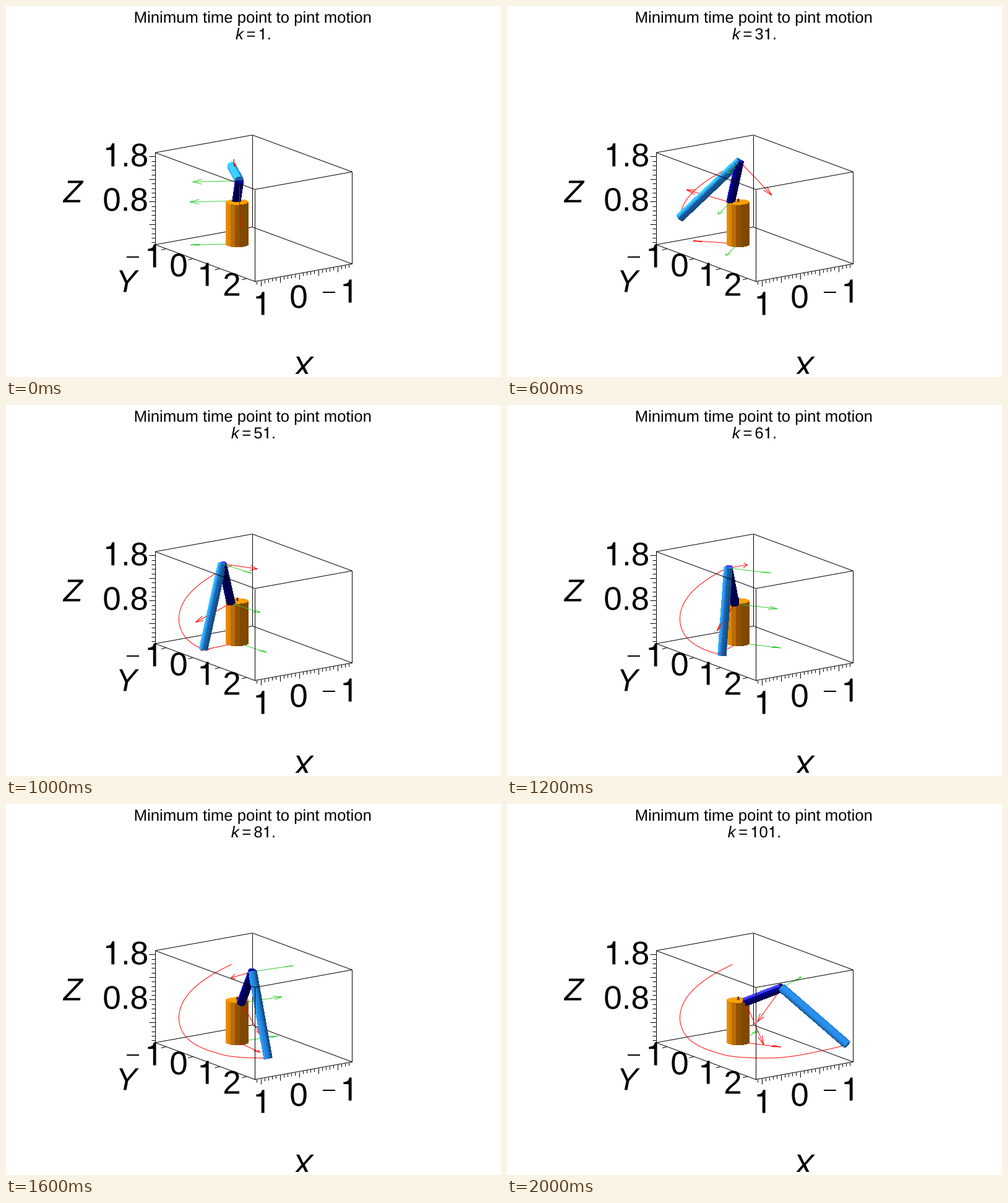
A matplotlib script that plays this animation: 800x600 px, repeating every 2.1 s.

```python
import numpy as np
import matplotlib.pyplot as plt
from matplotlib.animation import FuncAnimation
from matplotlib.collections import LineCollection, PolyCollection
from matplotlib.patches import PathPatch, Rectangle
from matplotlib.path import Path
from matplotlib.textpath import TextPath

W, H, DPI = 800, 600, 100
PX = 72 / DPI  # one pixel in points

# Orthographic camera: azimuth 55, polar angle 75
AZ, POL = np.radians([55, 75])
RIGHT = np.array([-np.sin(AZ), np.cos(AZ), 0])
VIEW = np.array([np.sin(POL) * np.cos(AZ), np.sin(POL) * np.sin(AZ), np.cos(POL)])
UP = np.cross(VIEW, RIGHT)
SCALE, ORIGIN = 75.7, np.array([373.7, 384.7])
LIGHT = -0.6 * RIGHT + 0.75 * UP + 0.3 * VIEW

LO, HI = np.array([-1.383, -1.41, -0.15]), np.array([1.15, 2.30, 1.885])
EZ = np.array([0.0, 0.0, 1.0])
BASE_R, BASE_H = 0.24, 0.915
SHOULDER_R, SHOULDER_Z = 0.17, 0.905
UPPER, FORE, LINK_R = 0.945, 1.88, 0.085

# Shade ramps: dark, middle, light
ORANGE = np.array([(128, 72, 0), (232, 140, 8), (255, 165, 0)]) / 255
NAVY = np.array([(0, 0, 72), (0, 0, 150), (70, 70, 255)]) / 255
SKY = np.array([(22, 78, 134), (42, 152, 250), (60, 212, 255)]) / 255
RED, GREEN, BLUE = (1, 0, 0), (0.2, 0.8, 0.2), (0, 0, 0.5)

# Joint angles in degrees: base turn, upper arm and forearm elevation
KNOTS = np.array([1, 21, 41, 61, 81, 91, 101.0])
JOINTS = np.array([
    [-120, -76.5, -23, 30.5, 84.5, 110.5, 120],
    [138, 119.6, 85, 68.3, 58.4, 43.9, 25.5],
    [-5.5, -28, -62.3, -80.2, -69.1, -51.7, -35],
])
SLOPES = np.gradient(JOINTS, KNOTS, axis=1)
SLOPES[:, [0, -1]] = 0


def project(p):
    p = np.asarray(p, float)
    return ORIGIN + SCALE * np.stack([p @ RIGHT, -(p @ UP)], axis=-1)


def joints(k):
    i = min(np.searchsorted(KNOTS, k, side="right") - 1, len(KNOTS) - 2)
    h = KNOTS[i + 1] - KNOTS[i]
    u = (k - KNOTS[i]) / h
    a, b = JOINTS[:, i], JOINTS[:, i + 1]
    ma, mb = SLOPES[:, i] * h, SLOPES[:, i + 1] * h
    s = u * u * (3 - 2 * u)
    return np.radians(a + (b - a) * s + ma * u * (1 - u) ** 2 - mb * u * u * (1 - u))


def pose(k):
    turn, q2, q3 = joints(k)
    out = np.array([np.cos(turn), np.sin(turn), 0])
    side = np.array([-np.sin(turn), np.cos(turn), 0])
    d2 = np.cos(q2) * out + np.sin(q2) * EZ
    d3 = np.cos(q3) * out + np.sin(q3) * EZ
    shoulder = SHOULDER_R * out + SHOULDER_Z * EZ
    elbow = shoulder + UPPER * d2
    return out, side, d2, d3, shoulder, elbow, elbow + FORE * d3


class Painter:
    """Collects small faces and strokes and sorts them by depth."""

    def __init__(self):
        self.items = []

    def face(self, pts, normal, ramp, bias):
        if normal @ VIEW <= 0:
            return
        t = max(0.0, normal @ LIGHT)
        rgb = [np.interp(t, [0, 0.55, 0.85], ramp[:, c]) for c in range(3)]
        depth = np.mean(pts, axis=0) @ VIEW + bias
        self.items.append((depth, project(pts), rgb, 0.5 * PX, False))

    def stroke(self, a, b, color, step=0.08):
        n = max(1, int(np.ceil(np.linalg.norm(b - a) / step)))
        pts = a + np.linspace(0, 1, n + 1)[:, None] * (b - a)
        for p, q in zip(pts, pts[1:]):
            depth = (p + q) @ VIEW / 2 + 0.02
            self.items.append((depth, project([p, q]), color, PX, True))

    def arrow(self, start, way, across, color):
        tip = start + way
        self.stroke(start, tip, color)
        for s in (-1, 1):
            self.stroke(tip, tip - 0.2 * way + s * 0.055 * across, color)

    def tube(self, start, axis, length, radius, side, ramp, bias=0.0, sides=16):
        other = np.cross(axis, side)
        ang = np.linspace(0, 2 * np.pi, sides + 1)
        ring = np.cos(ang)[:, None] * side + np.sin(ang)[:, None] * other
        cuts = np.linspace(0, length, int(length / 0.06) + 1)
        end = start + length * axis
        for r0, r1 in zip(ring, ring[1:]):
            normal = (r0 + r1) / np.linalg.norm(r0 + r1)
            e0, e1 = start + radius * r0, start + radius * r1
            for c0, c1 in zip(cuts, cuts[1:]):
                quad = [e0 + c0 * axis, e1 + c0 * axis, e1 + c1 * axis, e0 + c1 * axis]
                self.face(quad, normal, ramp, bias)
            self.face([start, e0, e1], -axis, ramp, bias)
            self.face([end, e0 + length * axis, e1 + length * axis], axis, ramp, bias)


def scene(k):
    p = Painter()
    out, side, d2, d3, shoulder, elbow, _ = pose(k)
    zero = np.zeros(3)
    p.tube(zero, EZ, BASE_H, BASE_R, np.array([1.0, 0, 0]), ORANGE)
    p.tube(shoulder, d2, UPPER, LINK_R, side, NAVY, 0.03)
    p.tube(elbow, d3, FORE, LINK_R, side, SKY, 0.03)

    p.arrow(zero, out, side, RED)
    p.arrow(zero, side, out, GREEN)
    p.arrow(zero, EZ, out, BLUE)
    for joint, along in ((shoulder, d2), (elbow, d3)):
        normal = np.cross(along, side)
        normal = -normal if normal @ np.cross(side, along) < 0 else normal
        normal = np.cross(side, along) if np.allclose(normal, 0) else normal
        normal = (along @ EZ) * out - (along @ out) * EZ
        p.arrow(joint, normal, along, RED)
        p.arrow(joint, side, normal, GREEN)

    path = [pose(t)[-1] for t in range(1, k + 1)]
    for a, b in zip(path, path[1:]):
        p.stroke(a, b, RED)
    return sorted(p.items, key=lambda item: item[0])


# Plain numeral one without a foot, in em units
ONE = np.array([(.259, 0), (.259, .5), (.102, .5), (.102, .565), (.18, .575),
                (.245, .61), (.283, .703), (.35, .703), (.35, 0), (.259, 0)])
ADVANCE = {".": 0.278, "=": 0.584}


def text_path(s, size, x=0.0, style="normal"):
    return TextPath((x, 0), s, size=size, prop={"family": "Liberation Sans", "style": style})


def number_path(s, size, x=0.0):
    parts = []
    for ch in s:
        if ch == "1":
            parts.append(Path(ONE * size + [x, 0], closed=True))
        else:
            parts.append(text_path(ch, size, x))
        x += ADVANCE.get(ch, 0.556) * size
    return Path.make_compound_path(*parts)


def place(path, x, y):
    return Path(path.vertices * [1, -1] + [x, y], path.codes)


def ink(path):
    patch = PathPatch(path, fc="k", lw=0, zorder=8)
    ax.add_patch(patch)
    return patch


def centred(path, cx, cy=None, base=None):
    box = path.get_extents()
    y = base if cy is None else cy + (box.y0 + box.y1) / 2
    return ink(place(path, cx - (box.x0 + box.x1) / 2, y))


def counter_path(k):
    s = f"{k}."
    left = 400.5 - (59 + 14.3 * (len(s) - 2)) / 2
    parts = [text_path("k", SMALL, 0, "italic"), text_path("=", SMALL, 17.5),
             number_path(s, SMALL, 36.5)]
    return place(Path.make_compound_path(*parts), left, 54)


def draw_box():
    near, far = [], []
    corners = np.array([(x, y, z) for x in (0, 1) for y in (0, 1) for z in (0, 1)])
    for i, a in enumerate(corners):
        for b in corners[i + 1:]:
            if abs(a - b).sum() == 1:
                edge = project([LO + a * (HI - LO), LO + b * (HI - LO)])
                (near if b.sum() == 3 else far).append(edge)
    for edges, z in ((far, 1), (near, 5)):
        ax.add_collection(LineCollection(edges, colors="k", linewidths=PX, zorder=z))


def draw_ticks():
    ticks = []

    def tick(point, dx, dy):
        p = project(point)
        ticks.append([p, p + [dx, dy]])

    for i in range(-13, 12):
        tick((i / 10, HI[1], LO[2]), 0, 9 if i % 5 == 0 else 5)
    for i in range(-1, 3):
        tick((HI[0], i, LO[2]), -8, 2)
    for i in range(-1, 19):
        tick((HI[0], LO[1], i / 10), -10 if i % 5 == 3 else -6, 0)
    ax.add_collection(LineCollection(ticks, colors="k", linewidths=PX, zorder=1))


fig = plt.figure(figsize=(W / DPI, H / DPI), dpi=DPI, facecolor="white")
ax = fig.add_axes([0, 0, 1, 1])
ax.set(xlim=(0, W), ylim=(H, 0))
ax.axis("off")

SMALL, BIG = 25.7, 53
draw_box()
draw_ticks()
centred(text_path("Minimum time point to pint motion", SMALL), 399, base=27)
for s, x, y in [("1.8", 195, 241), ("0.8", 193, 313),
                ("1", 236, 404), ("0", 279, 419), ("1", 321, 434), ("2", 365, 450),
                ("1", 411, 481), ("0", 473, 470), ("1", 552, 461)]:
    centred(number_path(s, BIG), x, y)
for s, x, y in [("Z", 108.5, 300), ("Y", 199, 445), ("X", 479.5, 584.5)]:
    centred(text_path(s, 51, style="italic"), x, y)
for x, y in [(195, 404.5), (512, 461.5)]:
    ax.add_patch(Rectangle((x, y), 20, 2.6, fc="k", lw=0, zorder=8))
ax.add_patch(Rectangle((0, 595), W, 5, fc="w", lw=0, zorder=9))

counter = ink(counter_path(1))
robot = PolyCollection([], zorder=3, joinstyle="bevel")
ax.add_collection(robot, autolim=False)


def update(i):
    k = 1 + 5 * i
    _, shapes, colors, widths, smooth = zip(*scene(k))
    robot.set_verts(shapes)
    robot.set_facecolor(colors)
    robot.set_edgecolor(colors)
    robot.set_linewidth(widths)
    robot.set_antialiased(smooth)
    counter.set_path(counter_path(k))
    return robot, counter


anim = FuncAnimation(fig, update, frames=21, interval=100, repeat=True, repeat_delay=0)
plt.show()
```
